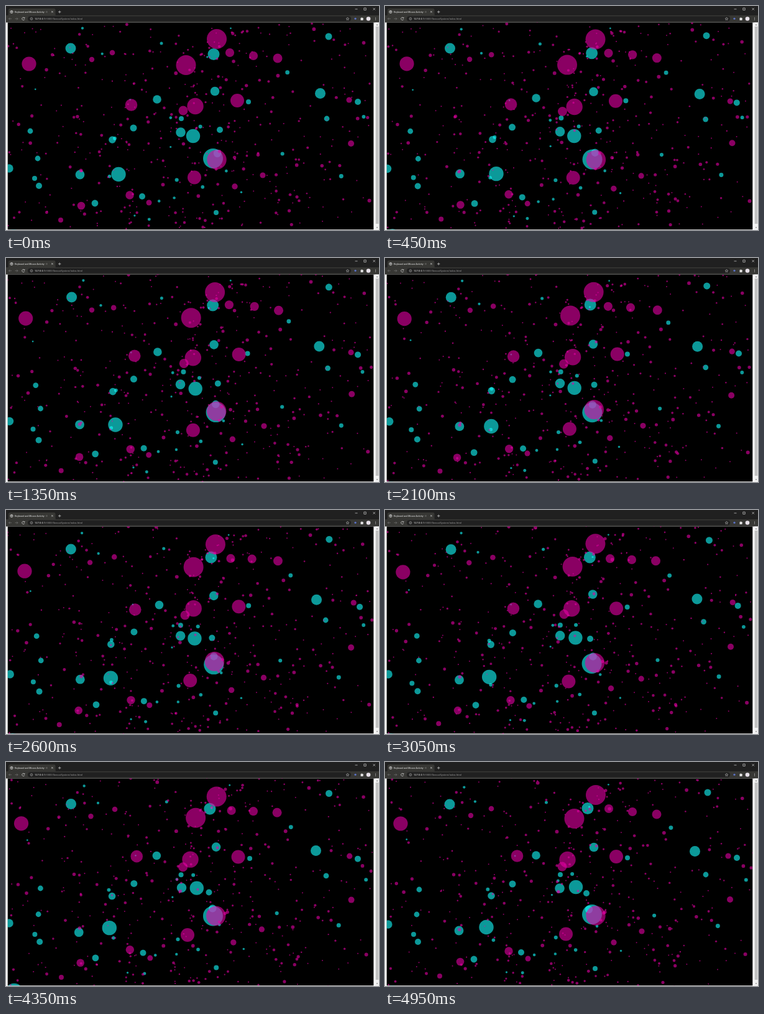
Animation of 600x360 px, one loop 5 s. Source, as an HTML page with a canvas:

```html
<!DOCTYPE html>
<html lang="en">
<head>
<meta charset="utf-8">
<title>Keyboard and Mouse Activity</title>
<style>
  html, body { margin: 0; width: 100%; height: 100%; overflow: hidden; background: #fff; }
  svg, canvas { position: absolute; left: 0; top: 0; width: 600px; height: 360px; display: block; }
  text { font-family: Roboto, "Open Sans", sans-serif; }
</style>
</head>
<body>
<svg viewBox="0 0 600 360">
  <defs>
    <linearGradient id="fade" x1="62" x2="70" gradientUnits="userSpaceOnUse">
      <stop stop-color="#e8e8e8"/><stop offset="1" stop-color="#e8e8e8" stop-opacity="0"/>
    </linearGradient>
  </defs>
  <rect width="600" height="16" fill="#202020"/>
  <rect y="15" width="600" height="11.5" fill="#373734"/>
  <path d="M2 15.5Q4 15 4 13V6.5Q4 4 6.5 4H77Q79.5 4 79.5 6.5V13Q79.5 15 81.5 15.5Z" fill="#373734"/>
  <g fill="none" stroke="#d5d5d5" stroke-width=".7">
    <circle cx="9" cy="9.5" r="2.2"/>
    <path d="M7 9h4M9 7.3v4.4M73 8l2.8 2.8m0-2.800L73 10.8M84 9.5h4.400m-2.200-2.200v4.400"/>
    <path d="M561.5 5h4M575.8 3.2h3.400v3.400h-3.400zM590.5 3.2l3.400 3.400m0-3.400l-3.400 3.400"/>
    <path d="M9 20.5H4.4m2-2l-2 2 2 2M14.5 20.5h4.600m-2-2l2 2-2 2" stroke="#707070"/>
    <path d="M29.7 19.2a2.2 2.2 0 1 0 .3 2M30 18v1.600h-1.700"/>
  </g>
  <rect x="35" y="16.5" width="520" height="8" rx="4" fill="#202020"/>
  <g fill="none" stroke="#b6b6b6" stroke-width=".6">
    <circle cx="41" cy="20.5" r="1.9"/><path d="M41 20.2v1.400M41 19.2v.5"/>
    <path d="M549.5 18.2l.7 1.600 1.700.1-1.300 1.100.4 1.700-1.500-.9-1.500.9.4-1.700-1.300-1.100 1.700-.1z"/>
  </g>
  <circle cx="562" cy="20.3" r="1.6" fill="#5b72c4"/>
  <path d="M570.5 19h1.200q.2-1.500 1.300 0h1.500v1.300q1.300.5 0 1.300v1.400h-4z" fill="#e0e0e0"/>
  <circle cx="583" cy="20.5" r="3.3" fill="#e9e2ea"/>
  <path d="M594.5 18.8h0m0 1.700h0m0 1.700h0" stroke="#d5d5d5" stroke-linecap="round"/>
  <text x="14" y="10.9" font-size="3.7" fill="url(#fade)">Keyboard and Mouse Activity - S</text>
  <text x="46" y="22" font-size="4.18" fill="#999"><tspan fill="#f2f2f2">127.0.0.1</tspan>:5500/SensorSystem/index.html</text>
  <rect x="594" y="26.5" width="6" height="333.5" fill="#f1f1f1"/>
  <rect x="594.7" y="33" width="4.6" height="317" fill="#c1c1c1"/>
  <path d="M595.8 31l1.200-1.500 1.200 1.500zM595.8 355.5l1.200 1.500 1.200-1.500z" fill="#555"/>
</svg>
<canvas></canvas>
<script>
const LEFT = 2.7, TOP = 26.6, W = 588.6, H = 332.6;
const FRAMES = 100, STEP = 50;
const CYAN = 'rgba(20, 255, 255, .6)', MAGENTA = 'rgba(230, 0, 166, .6)';

// Main circles: centre, radius and, for the wanderers, total drift
const cyan = [
  [12, 374, 15], [333, 245, 16], [172, 268, 11.7, -18, -5], [304, 205, 11.2, 6, -8],
  [330, 76, 9.5, -8, -3], [104, 68, 8.5], [502, 142, 8.5, -7, 3], [281, 203, 7.8],
  [119, 271, 7.4], [336, 137, 7.3], [243, 150, 6.8], [334, 237, 6.2, -12, 0],
  [519, 49, 5.5], [566, 154, 5], [205, 196, 5.5], [171, 215, 5.8],
  [47, 203, 4.4, 16, 4], [51, 245, 4.4], [46, 277, 4], [53, 289, 5],
  [143, 317, 5.4], [219, 306, 5], [338, 332, 4], [516, 181, 4.4],
  [390, 154, 4], [334, 205, 5, -20, 12], [282, 181, 4], [5, 261, 6.7]
];
const magenta = [
  [339, 53, 16], [297, 93, 16, 15, -4], [339, 247, 15.7], [299, 159, 13.2, -11, -4],
  [31, 96, 11.6, -12, 6], [372, 152, 11], [297, 276, 11, -12, 1], [207, 155, 9.8, 11, -8],
  [437, 84, 7.5], [285, 168, 7.5], [398, 80, 7.1], [360, 75, 7.1],
  [199, 304, 6.7], [121, 321, 6.3], [555, 221, 5], [552, 151, 4.6],
  [413, 272, 4.6], [368, 290, 4.7], [230, 316, 4.5], [171, 75, 4.3],
  [138, 86, 4.2], [88, 344, 4]
];

let seed = 20231;
function rand() {
  seed = (seed + 0x6D2B79F5) | 0;
  let n = Math.imul(seed ^ (seed >>> 15), seed | 1);
  n ^= n + Math.imul(n ^ (n >>> 7), n | 61);
  return ((n ^ (n >>> 14)) >>> 0) / 4294967296;
}
const spread = size => (rand() * 2 - 1) * size;

// Random walk around a middle value, with a given total drift
function walk(mid, drift) {
  const last = FRAMES - 1, sums = [0];
  for (let i = 1; i <= last; i++) sums.push(sums[i - 1] + spread(.8));
  return sums.map((s, i) => mid + s - sums[last] * i / last + drift * (i / last - .5));
}

const circle = color => ([x, y, r, dx = 0, dy = 0]) =>
  ({ r, color, x: walk(x, dx), y: walk(y, dy) });

// Small dots, denser towards the middle
function dots(count, color, minR, maxR, power) {
  return Array.from({ length: count }, () => {
    const x = rand() < .45 ? 300 + spread(120) + spread(110) : LEFT + rand() * W;
    const y = TOP + rand() * H;
    const r = minR + (maxR - minR) * rand() ** power;
    return circle(color)([x, y, r, spread(14), spread(14)]);
  });
}

const circles = [
  ...cyan.map(circle(CYAN)),
  ...dots(24, CYAN, 1.3, 3.5, 1),
  ...magenta.map(circle(MAGENTA)),
  ...dots(430, MAGENTA, 1, 3, 3)
];

const canvas = document.querySelector('canvas');
const ratio = window.devicePixelRatio || 1;
canvas.width = 600 * ratio;
canvas.height = 360 * ratio;
const ctx = canvas.getContext('2d');
ctx.scale(ratio, ratio);

function draw(tick) {
  ctx.clearRect(0, 0, 600, 360);
  ctx.save();
  ctx.beginPath();
  ctx.rect(LEFT, TOP, W, H);
  ctx.fillStyle = '#000';
  ctx.fill();
  ctx.clip();
  for (const c of circles) {
    ctx.fillStyle = c.color;
    ctx.beginPath();
    ctx.arc(c.x[tick], c.y[tick], c.r, 0, Math.PI * 2);
    ctx.fill();
  }
  ctx.restore();
}

const start = performance.now();
function loop() {
  draw(Math.floor((performance.now() - start) / STEP) % FRAMES);
  requestAnimationFrame(loop);
}
loop();
</script>
</body>
</html>
```
